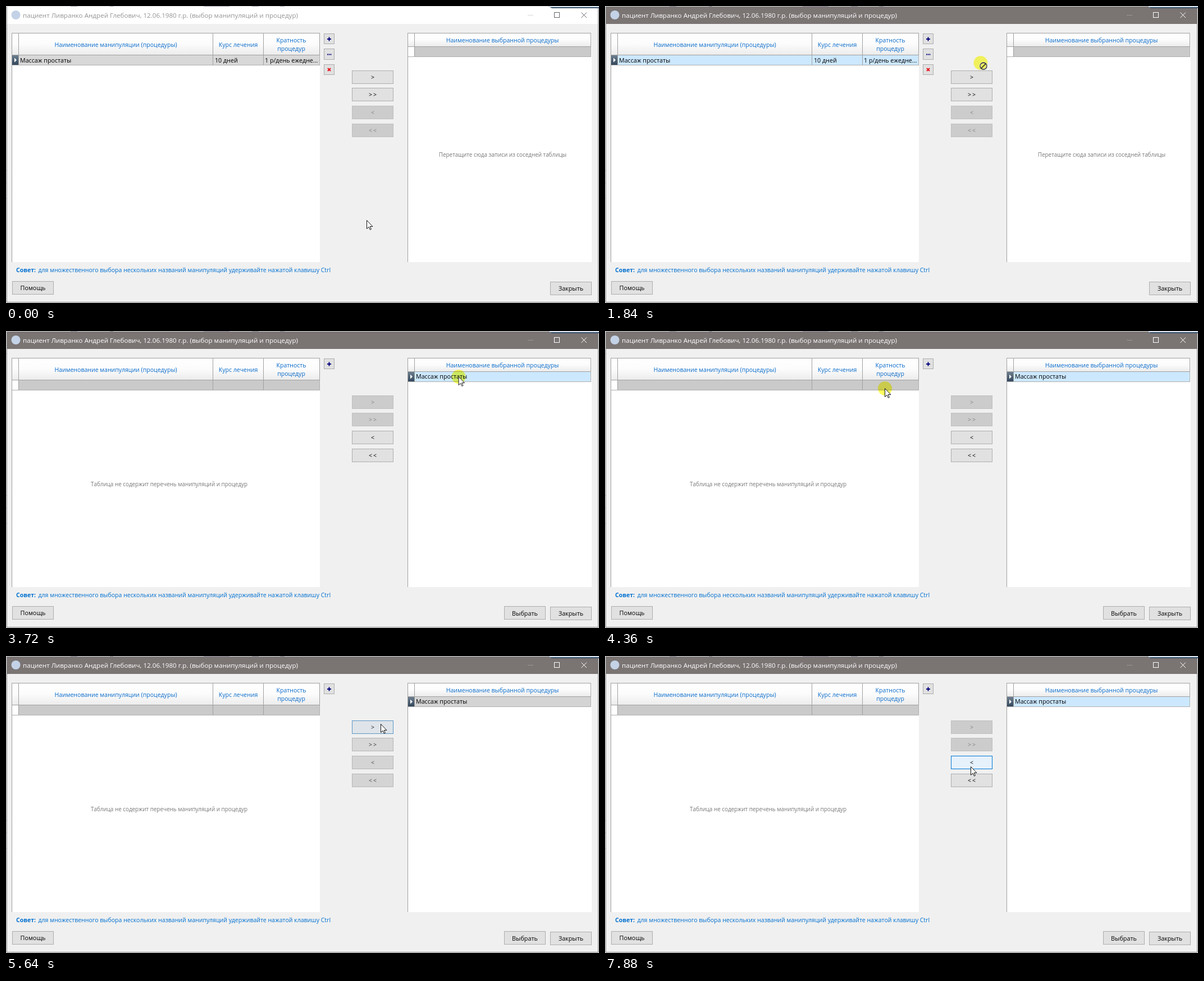
An HTML page for the animation above (8000 ms loop, 1056x530 px).

```html
<!DOCTYPE html>
<html lang="ru">
<head>
<meta charset="utf-8">
<title>Выбор манипуляций и процедур</title>
<style>
html, body { margin: 0; width: 100%; height: 100%; overflow: hidden; background: #efefef; }
svg { display: block; width: 1056px; height: 530px; font: 10.55px "Open Sans", "Noto Sans", sans-serif; }
rect, .line { shape-rendering: crispEdges; }
.cell { font-size: 10.7px; }
.head { fill: #0a6ccb; text-anchor: middle; }
.hint { fill: #787878; font-size: 9.9px; text-anchor: middle; }
.line { fill: none; stroke: #a0a0a0; }
.soft { stroke: #b0b0b0; }
.btn rect { fill: #e1e1e1; stroke: #adadad; }
.btn text { text-anchor: middle; }
.off rect { fill: #ccc; stroke: #bfbfbf; }
.off text { fill: #838383; }
.hot rect { fill: #e5f1fb; stroke: #0078d7; }
.arrows { letter-spacing: 2px; }
.cap { font-size: 10.8px; }

/* one loop = 8 s, 1% = 80 ms */
svg [class*="t-"] { animation: 8s linear infinite; }
svg .t-bar { animation-name: bar; }
svg .t-title { animation-name: title; }
svg .t-ctl { animation-name: ctl; }
svg .t-left { animation-name: left; }
svg .t-right { animation-name: right; }
svg .t-leftFade { animation-name: leftFade; }
svg .t-rightFade { animation-name: rightFade; }
svg .t-rowL { animation-name: rowL; }
svg .t-rowR { animation-name: rowR; }
svg .t-hotAdd { animation-name: hotAdd; }
svg .t-hotBack { animation-name: hotBack; }
svg .t-move { animation-name: move; }
svg .t-spot { animation-name: spot; }
svg .t-arrow { animation-name: arrow; }
svg .t-ban { animation-name: ban; }
.blend { mix-blend-mode: multiply; }

@keyframes bar { 0%, 3.48% { fill: #fff; } 3.49%, 100% { fill: #7a7473; } }
@keyframes title { 0%, 3.48% { fill: #949494; } 3.49%, 100% { fill: #fff; } }
@keyframes ctl { 0%, 3.48% { stroke: #666; } 3.49%, 100% { stroke: #fff; } }
@keyframes rowL { 0%, 3.48% { fill: #d8d8d8; } 3.49%, 100% { fill: #cce8ff; } }
@keyframes rowR { 0%, 57% { fill: #cce8ff; } 57.01%, 82.9% { fill: #d4d4d4; } 82.91%, 100% { fill: #cce8ff; } }
@keyframes left {
  0%, 30.98% { opacity: 1; } 30.99%, 56.98% { opacity: 0; }
  56.99%, 69.48% { opacity: 1; } 69.49%, 100% { opacity: 0; }
}
@keyframes right {
  0%, 30.98% { opacity: 0; } 30.99%, 56.98% { opacity: 1; }
  56.99%, 69.48% { opacity: 0; } 69.49%, 100% { opacity: 1; }
}
@keyframes leftFade {
  0%, 31% { opacity: 1; } 34%, 57% { opacity: 0; }
  60%, 69.5% { opacity: 1; } 72%, 100% { opacity: 0; }
}
@keyframes rightFade {
  0%, 31% { opacity: 0; } 34%, 57% { opacity: 1; }
  60%, 69.5% { opacity: 0; } 72%, 100% { opacity: 1; }
}
@keyframes hotAdd { 0%, 61% { opacity: 0; } 63.5%, 69.5% { opacity: 1; } 71.5%, 100% { opacity: 0; } }
@keyframes hotBack { 0%, 95% { opacity: 0; } 98.4%, 100% { opacity: 1; } }
@keyframes spot {
  0%, 17.98% { opacity: 0; } 17.99%, 30.98% { opacity: 1; }
  30.99%, 46.4% { opacity: 0; } 46.41%, 56.98% { opacity: 1; }
  56.99%, 67.98% { opacity: 0; } 67.99%, 69.48% { opacity: 1; }
  69.49%, 82.9% { opacity: 0; } 82.91%, 83.98% { opacity: 1; }
  83.99%, 100% { opacity: 0; }
}
@keyframes ban {
  0%, 18.48% { opacity: 0; } 18.49%, 24.5% { opacity: 1; }
  24.51%, 47.48% { opacity: 0; } 47.49%, 52.5% { opacity: 1; }
  52.51%, 100% { opacity: 0; }
}
@keyframes arrow {
  0%, 18.48% { opacity: 1; } 18.49%, 24.5% { opacity: 0; }
  24.51%, 47.48% { opacity: 1; } 47.49%, 52.5% { opacity: 0; }
  52.51%, 100% { opacity: 1; }
}
@keyframes move {
  0%, 3.5% { transform: translate(642px, 382px); }
  8% { transform: translate(528px, 150px); }
  13.5% { transform: translate(556px, 96px); }
  14.5%, 17.5% { transform: translate(459px, 97px); }
  18% { transform: translate(466px, 97px); }
  18.5%, 20% { transform: translate(474px, 98px); }
  23% { transform: translate(668px, 101px); }
  26% { transform: translate(770px, 118px); }
  28.5%, 31% { transform: translate(811px, 100px); }
  41% { transform: translate(806px, 84px); }
  42%, 46.5% { transform: translate(806px, 81px); }
  50.5% { transform: translate(650px, 106px); }
  54.5%, 57% { transform: translate(498px, 102px); }
  62.5%, 76.5% { transform: translate(667px, 121px); }
  82%, 86% { transform: translate(777px, 81px); }
  90.5% { transform: translate(700px, 140px); }
  95.5% { transform: translate(651px, 192px); }
  98.4%, 100% { transform: translate(651px, 197px); }
}
</style>
</head>
<body>
<svg viewBox="0 0 1056 530" xmlns="http://www.w3.org/2000/svg">
  <defs>
    <linearGradient id="hd" x2="0" y2="1"><stop stop-color="#fff"/><stop offset=".5" stop-color="#fcfcfc"/><stop offset="1" stop-color="#ececec"/></linearGradient>
    <linearGradient id="ind" x2="0" y2="1"><stop stop-color="#6d7f90"/><stop offset="1" stop-color="#33475c"/></linearGradient>
    <g id="mark">
      <rect width="11" height="17" fill="url(#ind)"/>
      <path d="M4 4.500l4 4-4 4z" fill="#fff"/>
    </g>
  </defs>

  <!-- desktop edges and window frame -->
  <rect width="1056" height="530" fill="#d3d6d9"/>
  <path class="line" d="M115 .5h12M185 .5h6M352 .5h46M438 .5h12M488 .5h8M0 40.500h1M0 293.500h1M0 315.500h1M0 343.500h1" style="stroke:#99a"/>
  <rect x="1.500" y="1.500" width="1053" height="527" fill="#f0f0f0" stroke="#8c8c8c"/>
  <rect class="t-bar" x="2" y="1" width="1052" height="31"/>
  <path d="M965 0h91v4h-84z" fill="#35506b"/>
  <path d="M965 0h91v2h-87z" fill="#dfe8f2"/>
  <circle cx="17.500" cy="16" r="8" fill="#c3d2e6"/>
  <text class="t-title" x="30" y="21" font-size="11.640">пациент Ливранко Андрей Глебович, 12.06.1980 г.р. (выбор манипуляций и процедур)</text>
  <g opacity=".25"><path class="line t-ctl" d="M929 16.500h10"/></g>
  <path class="line t-ctl" d="M976.500 11.500h9v9h-9z"/>
  <path class="t-ctl" d="M1024.500 11.500l9.500 9.500m0-9.500l-9.500 9.500" fill="none"/>

  <!-- left grid -->
  <rect x="10" y="48" width="549" height="409" fill="#fff"/>
  <rect x="10" y="48" width="549" height="39" fill="url(#hd)"/>
  <rect x="23" y="88" width="535" height="17" fill="#cacaca"/>
  <g class="t-left">
    <rect class="t-rowL" x="23" y="88" width="535" height="17"/>
    <use href="#mark" x="11" y="88"/>
    <g class="cell">
      <text x="25" y="101">Массаж простаты</text>
      <text x="372" y="101">10 дней</text>
      <text x="461" y="101">1 р/день ежедне...</text>
    </g>
  </g>
  <path class="line soft" d="M10 105.500h549M558.500 88v17"/>
  <path class="line" d="M10.500 457V48.500H558.500V88M10 87.500h549M22.500 48v57M368.500 48v57M458.500 48v57"/>
  <text class="head" x="195.500" y="73">Наименование манипуляции (процедуры)</text>
  <text class="head" x="413.500" y="73">Курс лечения</text>
  <text class="head" x="508" y="64.500">Кратность</text>
  <text class="head" x="508" y="80">процедур</text>
  <text class="hint t-right" x="290.500" y="276.500">Таблица не содержит перечень манипуляций и процедур</text>

  <!-- right grid -->
  <rect x="715" y="48" width="328" height="409" fill="#fff"/>
  <rect x="715" y="48" width="327" height="24" fill="url(#hd)"/>
  <rect x="728" y="73" width="313" height="17" fill="#cacaca"/>
  <g class="t-right">
    <rect class="t-rowR" x="728" y="73" width="313" height="17"/>
    <use href="#mark" x="716" y="73"/>
    <text class="cell" x="730" y="85">Массаж простаты</text>
  </g>
  <path class="line soft" d="M715 90.500h327M1041.500 73v17"/>
  <path class="line" d="M715.500 457V48.500H1041.500V73M715 72.500h327M727.500 48v42"/>
  <text class="head" x="884" y="64.500">Наименование выбранной процедуры</text>
  <text class="hint t-left" x="884.500" y="269">Перетащите сюда записи из соседней таблицы</text>

  <!-- row tools -->
  <g class="btn"><rect x="566.500" y="49.500" width="18" height="18"/></g>
  <path d="M572 59h7M575.500 55.500v7" stroke="#00007c" stroke-width="2"/>
  <g class="t-left">
    <g class="btn"><rect x="566.500" y="76.500" width="18" height="19"/><rect x="566.500" y="104.500" width="18" height="18"/></g>
    <path d="M572 86.500h7.500" stroke="#00007c" stroke-width="1.800" stroke-dasharray="1.800 1"/>
    <path d="M573 111l5 5m0-5l-5 5" stroke="#e8101c" stroke-width="2"/>
  </g>

  <!-- transfer buttons -->
  <g class="btn off arrows">
    <rect x="616.500" y="115.500" width="73" height="23"/><text x="654" y="131">&gt;</text>
    <rect x="616.500" y="146.500" width="73" height="23"/><text x="654" y="162">&gt;&gt;</text>
    <rect x="616.500" y="178.500" width="73" height="23"/><text x="654" y="194">&lt;</text>
    <rect x="616.500" y="210.500" width="73" height="23"/><text x="654" y="226">&lt;&lt;</text>
  </g>
  <g class="btn arrows t-leftFade">
    <rect x="616.500" y="115.500" width="73" height="23"/><text x="654" y="131">&gt;</text>
    <rect x="616.500" y="146.500" width="73" height="23"/><text x="654" y="162">&gt;&gt;</text>
  </g>
  <g class="btn arrows t-rightFade">
    <rect x="616.500" y="178.500" width="73" height="23"/><text x="654" y="194">&lt;</text>
    <rect x="616.500" y="210.500" width="73" height="23"/><text x="654" y="226">&lt;&lt;</text>
  </g>
  <g class="btn hot arrows t-hotAdd"><rect x="616.500" y="115.500" width="73" height="23"/><text x="654" y="131">&gt;</text></g>
  <g class="btn hot arrows t-hotBack"><rect x="616.500" y="178.500" width="73" height="23"/><text x="654" y="194">&lt;</text></g>

  <!-- footer -->
  <text x="18" y="475" fill="#0070d0" font-weight="700">Совет:</text>
  <text x="57.500" y="475" fill="#0070d0" font-size="10.560">для множественного выбора нескольких названий манипуляций удерживайте нажатой клавишу Ctrl</text>
  <g class="btn cap">
    <rect x="11.500" y="491.500" width="73" height="23"/><text x="48" y="507">Помощь</text>
    <rect x="969.500" y="492.500" width="73" height="23"/><text x="1006" y="507.500">Закрыть</text>
  </g>
  <g class="btn cap t-right"><rect x="887.500" y="491.500" width="73" height="23"/><text x="924" y="507.500">Выбрать</text></g>

  <!-- pointer -->
  <g class="t-move blend"><circle class="t-spot" cx=".5" cy=".5" r="12.500" fill="#ffff60"/></g>
  <g class="t-move">
    <path class="t-arrow" d="M.5.500v15l3.500-3.200 2.400 5 2-1-2.300-4.800h4.800z" fill="#fff" stroke="#111"/>
    <g class="t-ban" fill="none">
      <circle cx="5.500" cy="6" r="6" stroke="#fff" stroke-width="2.600"/>
      <circle cx="5.500" cy="6" r="6" stroke="#111" stroke-width="1.300"/>
      <path d="M9.700 1.800l-8.400 8.400" stroke="#111" stroke-width="1.500"/>
    </g>
  </g>
</svg>
</body>
</html>
```
